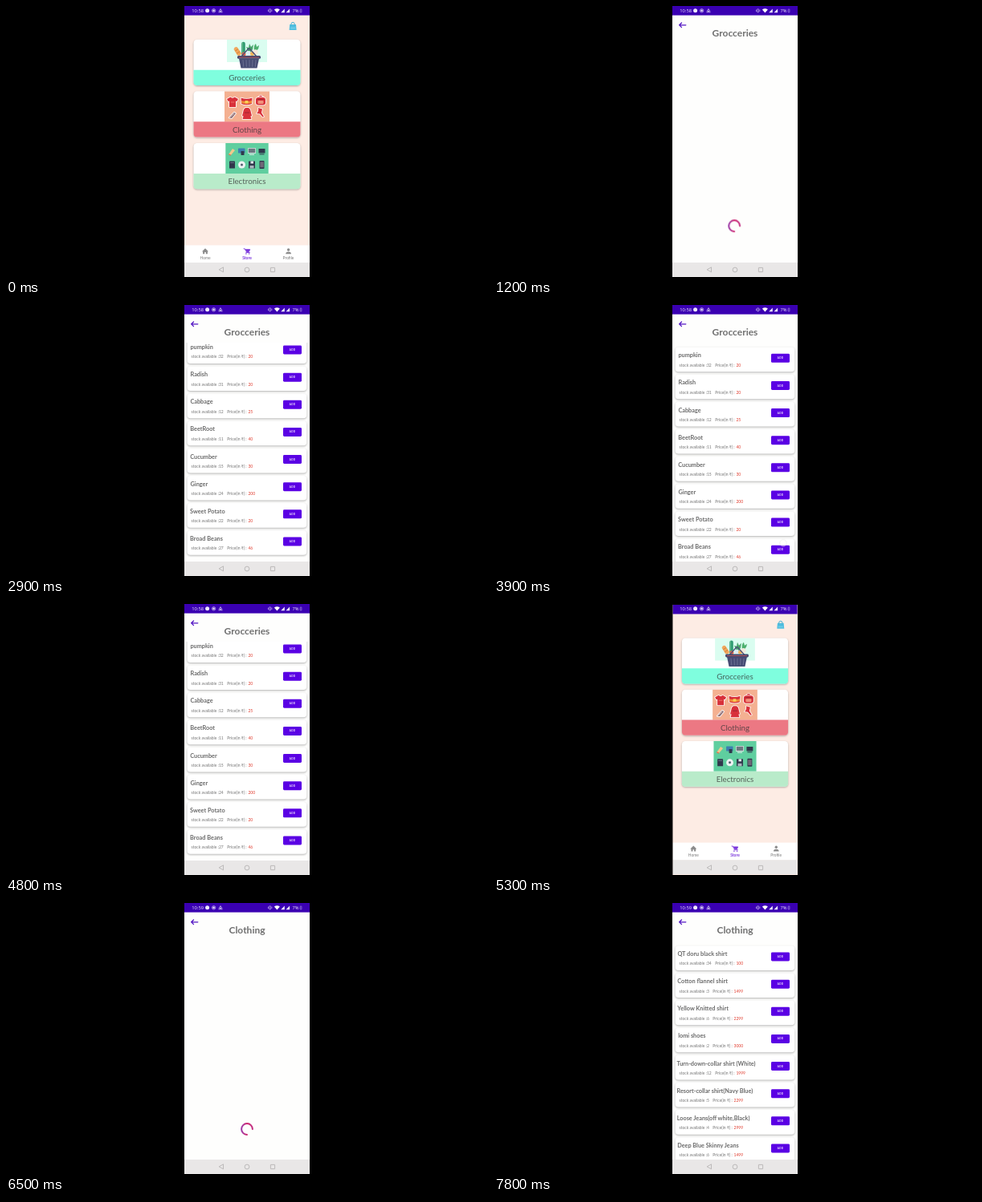
An HTML page that plays this animation: 600 by 338 pixels, repeating every 8000 ms.

```html
<!DOCTYPE html>
<html lang="en">
<head>
<meta charset="utf-8">
<title>Store app</title>
<style>
  html, body { margin: 0; width: 100%; height: 100%; overflow: hidden; background: #000; }
  svg { display: block; width: 100vw; height: 100vh; font-family: Lato, "Open Sans", sans-serif; }
  .mid { text-anchor: middle; }
  .shade { filter: drop-shadow(0 1px 1.2px rgba(0, 0, 0, .3)); }
  .title { font-size: 12px; font-weight: 700; fill: #707070; }
  .label { font-size: 9.8px; fill: #333; fill-opacity: .75; }
  .name { font-size: 7.3px; font-weight: 700; fill: #6a6a6a; }
  .info { font-size: 5px; fill: #757575; }
  .price { fill: #e0392b; }
  .add { font-size: 2.9px; font-weight: 700; fill: #fff; letter-spacing: .35px; }
  .tab { font-size: 4.9px; fill: #7a7a7a; }
  .tab.on { fill: #7a35dc; font-weight: 700; }
  .status { font-size: 5.8px; fill: #eee8ff; font-family: "Open Sans", sans-serif; }

  /* 1% of the loop is 80 ms */
  .loop { animation: 8s linear infinite; }
  #store { transform-origin: 300px 169px; animation-name: depth; }
  #groc { animation-name: groc; }
  #cloth { animation-name: cloth; }
  #grocList { animation-name: grocList; }
  #grocWait { animation-name: grocWait; }
  #clothList { animation-name: clothList; }
  #clothWait { animation-name: clothWait; }
  #scroll { animation-name: scroll; }
  #finger { animation-name: finger; }
  #early { animation-name: early; }
  #late { animation-name: late; }
  .spin { transform-origin: 0 0; animation: spin 1s linear infinite; }

  @keyframes depth {
    0% { transform: scale(1); }
    10.6% { transform: scale(1); animation-timing-function: ease-out; }
    13.5% { transform: scale(.94); }
    61.9% { transform: scale(.94); animation-timing-function: cubic-bezier(.15, .6, .45, 1); }
    69.4% { transform: scale(1); }
    76.9% { transform: scale(1); animation-timing-function: ease-out; }
    80%, 100% { transform: scale(.94); }
  }
  @keyframes groc {
    0%, 10.6% { transform: translateX(157px); }
    10.6% { animation-timing-function: ease-out; }
    13.5%, 61.9% { transform: none; }
    61.9% { animation-timing-function: ease-in-out; }
    65.6%, 100% { transform: translateX(157px); }
  }
  @keyframes cloth {
    0%, 76.9% { transform: translateX(157px); }
    76.9% { animation-timing-function: ease-out; }
    80%, 100% { transform: none; }
  }
  @keyframes grocWait { 0%, 16.2% { opacity: 1; } 16.21%, 100% { opacity: 0; } }
  @keyframes grocList { 0%, 16.2% { opacity: 0; } 16.21%, 100% { opacity: 1; } }
  @keyframes clothWait { 0%, 83.7% { opacity: 1; } 83.71%, 100% { opacity: 0; } }
  @keyframes clothList { 0%, 83.7% { opacity: 0; } 83.71%, 100% { opacity: 1; } }
  @keyframes scroll {
    0%, 24.5% { transform: none; }
    24.5% { animation-timing-function: ease-in-out; }
    29.4%, 41% { transform: translateY(-11px); }
    41% { animation-timing-function: ease-out; }
    48%, 49% { transform: translateY(-.7px); }
    51.2%, 100% { transform: translateY(-11px); }
  }
  @keyframes finger {
    0%, 24.9% { opacity: 0; transform: translate(339px, 205px); }
    25% { opacity: 1; transform: translate(339px, 205px); }
    30% { opacity: 1; transform: translate(334px, 156px); }
    34.9% { opacity: 1; transform: translate(332px, 126px); }
    35%, 41.2% { opacity: 0; transform: translate(346px, 205px); }
    41.25% { opacity: 1; transform: translate(346px, 205px); }
    48.75% { opacity: 1; transform: translate(360px, 297px); }
    52.3% { opacity: 1; transform: translate(362.5px, 252px); }
    52.4%, 100% { opacity: 0; transform: translate(362.5px, 252px); }
  }
  @keyframes early { 0%, 76.2% { opacity: 1; } 76.21%, 100% { opacity: 0; } }
  @keyframes late { 0%, 76.2% { opacity: 0; } 76.21%, 100% { opacity: 1; } }
  @keyframes spin { to { transform: rotate(360deg); } }
</style>
</head>
<body>
<svg id="stage" viewBox="0 0 600 338"></svg>
<script>
const rect = (x, y, w, h, fill, r = 0, more = '') =>
  `<rect x="${x}" y="${y}" width="${w}" height="${h}" rx="${r}" fill="${fill}" ${more}/>`;
const disc = (x, y, r, fill, more = '') => `<circle cx="${x}" cy="${y}" r="${r}" fill="${fill}" ${more}/>`;
const path = (d, fill, more = '') => `<path d="${d}" fill="${fill}" ${more}/>`;
const line = (d, color, w) =>
  path(d, 'none', `stroke="${color}" stroke-width="${w}" stroke-linecap="round" stroke-linejoin="round"`);
const text = (x, y, cls, s) => `<text x="${x}" y="${y}" class="${cls}">${s}</text>`;
const group = (more, ...parts) => `<g ${more}>${parts.join('')}</g>`;
const at = (x, y, ...parts) => group(`transform="translate(${x} ${y})"`, ...parts);

const screen = bg => rect(222, 0, 156, 338, bg) + rect(222, 0, 156, 11.6, '#3a00b2') + rect(222, 320, 156, 18, '#e9e7e7');

// Store pictures
const basket = rect(275, 42, 50, 28, '#dafdf0') +
  line('M295.5 47V60', '#2f9c72', 4.6) + line('M294.5 46V59', '#6cc08f', .8) +
  path('M303 60l-4-9l3 1l1-5l2 4l3-3l-1 6z', '#48a46b') +
  path('M309 56q-1-7 2-9l1 4l3-2q0 4-3 7z', '#4caf6d') + disc(310.5, 57.5, 3.2, '#f1e9dc') +
  path('M283.5 54q1-4 4.5-2.5l5 7.500q-1 4-5 2.500z', '#f0a75c') + line('M285.5 56l3-2M287.5 59l3-2', '#c4702a', .7) +
  rect(300, 56, 4.5, 6, '#dcecf2', 1.5) + disc(296, 60, 2.5, '#e0634f') + disc(306.5, 59.5, 2.5, '#f0b45a') +
  line('M293 63L301 54Q302.5 52 304 54L312 63', '#4b5078', 1.4) +
  rect(288, 62, 29, 3.8, '#3d426a', 1.5) + path('M290 65.500H315L312.500 77.500H292.500Z', '#474c74') +
  line('M290 64h25', '#d5605c', .8) +
  line('M295 67.5l.7 8M299 67.5l.4 8M303 67.5v8M307 67.5l-.4 8M311 67.5l-.7 8', '#7a7f9f', .7);

const sticker = 'stroke="#fff" stroke-width="1.6" stroke-linejoin="round" paint-order="stroke"';
const red = '#d8303a';
const clothes = rect(272, 106.5, 56, 38, '#f4b091') +
  at(282, 120, path('M-2.500-6.500L-7-4L-5.500-1L-4-1.500V6H4V-1.500L5.500-1L7-4L2.500-6.500Q0-4-2.500-6.500Z', red, sticker), line('M-2 0H2', '#ef7d72', .8)) +
  at(299.5, 119, path('M-7-4.500Q0-2 7-4.500L6.500 3Q0 5.500-6.500 3Z', red, sticker), path('M-6.700-1Q0 1 6.700-1L6.500 2Q0 4-6.500 2Z', '#f08c3c'), rect(-2, -1, 4, 3.5, '#f7cf55', .5)) +
  at(317, 118, path('M-3-4Q0-9 3-4Z', red, sticker), rect(-6, -4, 12, 9.5, red, 3, sticker), rect(-3.5, 0, 7, 4, '#f0917c', 1), line('M-4-1.500H4', '#8d2230', .8)) +
  at(282, 136, path('M-4.500 3.500L2-3.500L4-2L-1 4Z', '#8b6f78', sticker), line('M-4 3.500L2-2', '#f2d4cc', .8)) +
  at(300, 134, path('M-2-7H2L4-5L6 3L4.500 3.500L3-1L5.500 7H-5.500L-3-1L-4.500 3.500L-6 3L-4-5Z', red, sticker), line('M-2.500-1H2.500', '#8d2230', .8)) +
  at(317, 133, path('M-3-6L2-4.500L1 0L4 5L2.500 5.500L-1 1.500L-5 1Q-2-2-3-6Z', red, sticker));

const dark = '#30384c';
const gadgets = rect(273.3, 171, 53.4, 38, '#5fce9f') +
  at(281, 182, path('M-4 3L1-4L4-2L-1 4Z', '#f0c98c'), line('M-3.500 3l2 1', '#e2704f', 1.2)) +
  at(293, 181, rect(-4, -3.5, 8.5, 6, '#3d7fb0', .7), rect(-.5, 0, 4, 5, dark, .5)) +
  at(306, 181, rect(-5, -4, 10, 7, '#d5e2e0', .6), rect(-4.2, -3.2, 8.4, 5.2, '#6b7780'), rect(-3, 3.8, 6, 1, '#e8efef')) +
  at(318.5, 181, rect(-4, -3, 8, 5.5, dark, .5), rect(-3, 3.4, 6, 1, dark)) +
  at(281.5, 198, rect(-3.5, -4.5, 7, 9, dark, .6), line('M-2-2.500h4', '#6f7d90', .8)) +
  at(293.5, 198, disc(0, 0, 4.5, '#edf2f2'), disc(0, 0, 1.5, '#525b70')) +
  at(306, 198, rect(-4, -4.5, 8, 9, dark, .5), rect(-1.5, -4.5, 3.5, 3, '#dfe7ea'), rect(-2.5, 1, 5, 3.5, '#aab4bd')) +
  at(318.5, 198, rect(-3, -5, 6, 10, dark, .8), rect(-2.2, -3.7, 4.4, 7, '#6f6878'));

const storeCard = (y, art, color, label) =>
  group('class="shade"', rect(233.5, y, 133, 57.3, '#fff', 4.5)) + art +
  path(`M233.5 ${y + 38}h133v14.8q0 4.5-4.5 4.5h-124q-4.5 0-4.5-4.5z`, color) +
  text(300, y + 51.3, 'label mid', label);

const bag = path('M353.2 23H361L361.6 30H352.6Z', '#52bfe0') + line('M355 24.5v-2a2.1 2.1 0 0 1 4.200 0v2', '#45b0d2', 1) +
  line('M354.5 27.500h5.200', '#8fdcf0', .7);

const soft = '#8c8c8c', accent = '#7a35dc';
const tabs = rect(222, 298.4, 156, 21.6, '#fff') +
  path('M248 302.300L252 306.200H250.900V309.300H248.800V307H247.200V309.300H245.100V306.200H244Z', soft) +
  line('M296 302.800h1.300l1.900 3.700h3.200l1.300-2.800h-5.700M298.800 307.500h4.500', accent, .9) +
  path('M298.200 303.700h5.400l-1.200 2.600h-3z', accent) +
  disc(298.9, 309, .8, accent) + disc(302.6, 309, .8, accent) +
  disc(351.6, 304, 1.7, soft) + path('M348.200 309.200q0-2.700 3.400-2.700t3.400 2.700z', soft) +
  text(248, 315.8, 'tab mid', 'Home') + text(300, 315.8, 'tab on mid', 'Store') + text(351.5, 315.8, 'tab mid', 'Profile');

const store = group('id="store" class="loop"', screen('#fdece4'), bag,
  storeCard(41.8, basket, '#7ffede', 'Grocceries'),
  storeCard(106.3, clothes, '#ec7883', 'Clothing'),
  storeCard(170.9, gadgets, '#b9ebca', 'Electronics'), tabs);

// Product pages
const product = ([name, stock, price], i) => at(0, (53.3 + i * 34.13).toFixed(2),
  group('class="shade"', rect(225.6, 0, 148.6, 30.6, '#fff', 4)),
  text(230 - name.length / 12, 12.7, 'name', name),
  text(230.5, 24.2, 'info', `stock available :${stock}<tspan dx="4.5">Price(in ₹) :</tspan><tspan dx="1.8" class="price">${price}</tspan>`),
  rect(345, 8.2, 23, 11, '#5a00e4', 1.4), text(356.6, 14.8, 'add mid', 'ADD'));

const spinner = (x, y, delay) => at(x, y, group(`class="spin" style="animation-delay:${delay}ms"`,
  line('M6.9 0A6.9 6.9 0 1 0 0 6.9', 'url(#hue)', 2)));

const page = (id, title, wait, list) => group(`id="${id}" class="loop"`, screen('#fefefd'),
  line('M238.8 23.8H230.8M233.5 21L230.7 23.8L233.5 26.6', '#5417c4', 1.3),
  text(300, 37.7, 'title mid', title),
  group(`id="${id}Wait" class="loop"`, wait),
  group('clip-path="url(#view)"', group(`id="${id}List" class="loop"`, list)));

const groceries = [['pumpkin', 32, 20], ['Radish', 31, 20], ['Cabbage', 12, 25], ['BeetRoot', 11, 40],
  ['Cucumber', 15, 30], ['Ginger', 24, 200], ['Sweet Potato', 22, 20], ['Broad Beans', 27, 46]];
const garments = [['QT doru black shirt', 34, 100], ['Cotton flannel shirt', 3, 1499], ['Yellow Knitted shirt', 6, 2299],
  ['lomi shoes', 2, 3000], ['Turn-down-collar shirt (White)', 12, 1999], ['Resort-collar shirt(Navy Blue)', 5, 2299],
  ['Loose Jeans(off white,Black)', 4, 2999], ['Deep Blue Skinny Jeans', 6, 1499]];

// System icons stay put above every screen
const pale = '#eee8ff';
const system =
  group('id="early" class="loop"', text(231.3, 7.9, 'status', '10:58')) +
  group('id="late" class="loop"', text(231.3, 7.9, 'status', '10:59')) +
  disc(250.6, 5.8, 2.5, pale) +
  disc(258.6, 5.8, 2.2, 'none', `stroke="${pale}" stroke-width=".6"`) + disc(258.6, 5.8, 1.3, pale) +
  line('M265.2 6.500L267 3.600L268.800 6.500M264.900 7.800h1.600v-1.600M269.100 7.800h-1.600v-1.600', pale, .7) +
  rect(327.6, 3.8, 2, 4, 'none', .6, `stroke="${pale}" stroke-width=".6"`) + line('M326.3 5v1.600M330.9 5v1.600', pale, .5) +
  path('M333.9 4.600Q337.4 2 340.9 4.600L337.4 8.600Z', '#fff') +
  path('M342.2 8.200h4.600V3.400zM348.500 8.200h4.600V3.400z', pale) +
  text(356.4, 7.9, 'status', '7%') +
  rect(366.2, 4, 1.7, 4, 'none', .4, 'stroke="#cfc2f2" stroke-width=".5"') +
  line('M270.5 326.200V331.800L265.500 329Z', '#a9a7a7', .7) +
  disc(300, 329, 2.9, 'none', 'stroke="#a9a7a7" stroke-width=".7"') +
  rect(329.4, 326.4, 5.2, 5.2, 'none', .3, 'stroke="#a9a7a7" stroke-width=".7"');

const finger = group('id="finger" class="loop"',
  disc(0, 0, 4.2, '#fff', 'fill-opacity=".4" stroke="#d8d8d8" stroke-opacity=".6" stroke-width=".6"'));

document.getElementById('stage').innerHTML = `<defs>
  <clipPath id="phone"><rect x="222" width="156" height="338"/></clipPath>
  <clipPath id="view"><rect x="222" y="47" width="156" height="273"/></clipPath>
  <linearGradient id="hue" gradientUnits="userSpaceOnUse" x1="-7" y1="0" x2="7" y2="0">
    <stop stop-color="#9a3aa8"/><stop offset=".5" stop-color="#d0246e"/><stop offset="1" stop-color="#c02a80"/>
  </linearGradient></defs>` +
  rect(0, 0, 600, 338, '#000') +
  group('clip-path="url(#phone)"', store,
    page('groc', 'Grocceries', spinner(299.2, 274.3, -800),
      group('id="scroll" class="loop"', ...groceries.map(product))),
    page('cloth', 'Clothing', spinner(300, 282, -500), garments.map(product).join('')),
    system, finger);
</script>
</body>
</html>
```
